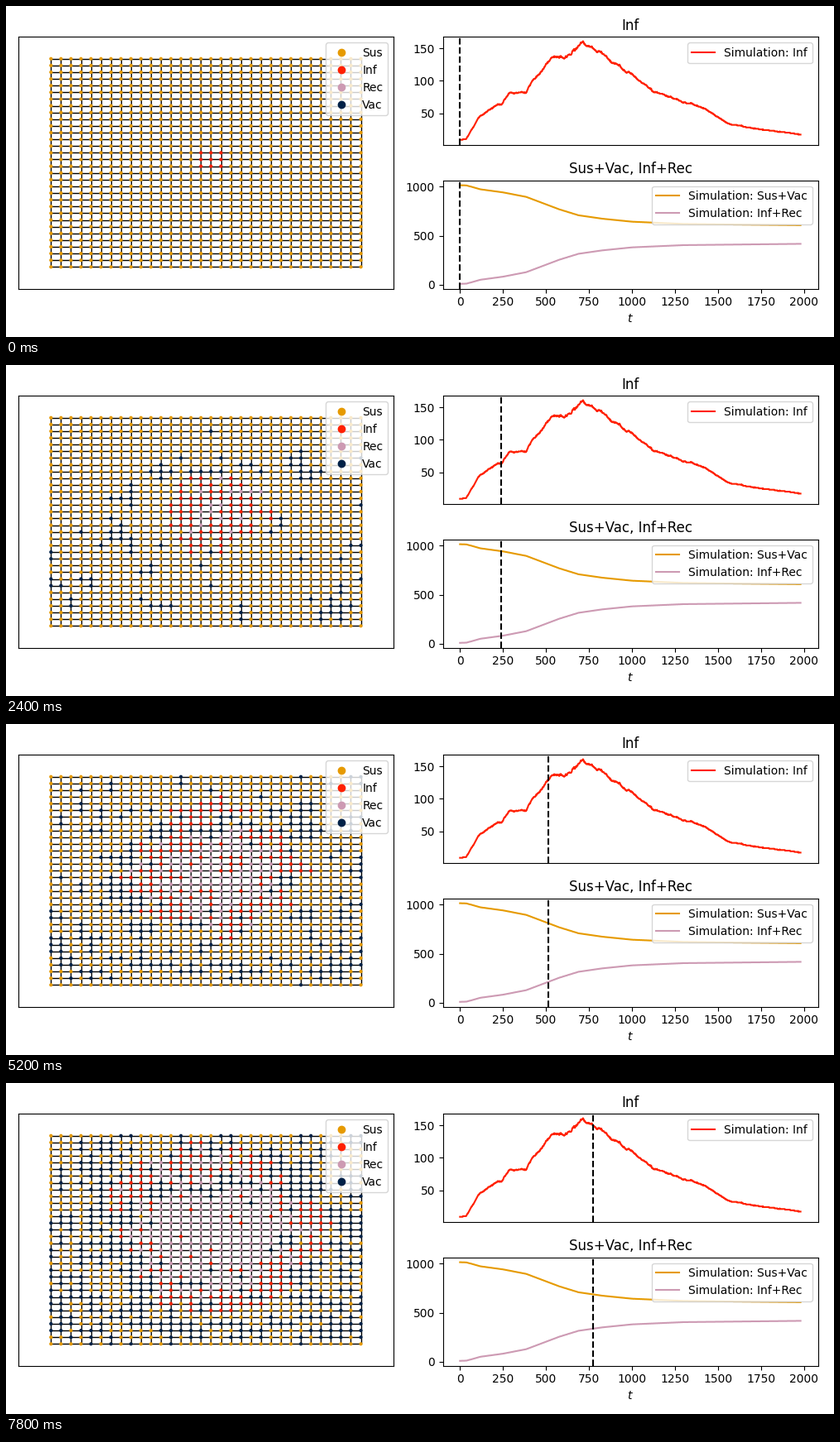
Write a matplotlib script that moves like this. It is 1000 px wide and 400 px high and loops after 8 s.

```python
import random

import matplotlib.pyplot as plt
import numpy as np
from matplotlib.animation import FuncAnimation
from matplotlib.collections import LineCollection
from matplotlib.lines import Line2D

N = 32
FRAMES = 40
STEP = 19.8          # simulation time per frame
T_END = 1980
SUS, INF, REC, VAC = range(4)
NAMES = ["Sus", "Inf", "Rec", "Vac"]
COLORS = np.array(["#E69A00", "#FF2000", "#CD9AB3", "#002147"])

# Key points (time, count): infected now, and infected at any time so far
INF_KEYS = [(0, 9), (36, 10), (113, 45), (209, 62), (245, 64), (290, 82),
            (382, 80), (420, 100), (531, 133), (622, 138), (714, 159),
            (900, 127), (1130, 83), (1300, 67), (1420, 58), (1560, 34),
            (1700, 27), (T_END, 17)]
EVER_KEYS = [(0, 9), (38, 11), (120, 51), (250, 82), (385, 128), (577, 255),
             (690, 316), (830, 351), (1000, 381), (1300, 404), (T_END, 417)]


def curve(keys, t):
    return np.interp(t, *zip(*keys))


def vaccinated(t):
    return int(0.34 * t + 0.00013 * t * t)


def neighbours(node):
    c, r = node
    near = [(c - 1, r), (c + 1, r), (c, r - 1), (c, r + 1)]
    return [(a, b) for a, b in near if 0 <= a < N and 0 <= b < N]


def simulate():
    """Node states per frame, following the infection and vaccination counts."""
    rng = random.Random(7)
    nodes = [(c, r) for c in range(N) for r in range(N)]
    state = dict.fromkeys(nodes, SUS)
    front = {(c, r): np.hypot(c - 16, 0.92 * (r - 17)) + rng.gauss(0, 1.3)
             for c, r in nodes}
    sick = [(c, r) for c in (15, 16, 17) for r in (15, 16, 17)]
    state.update(dict.fromkeys(sick, INF))
    ever, doses, t = len(sick), 0, 0
    shots = []

    def infect():
        exposed = {m for n in sick for m in neighbours(n) if state[m] == SUS}
        if not exposed:
            return False
        node = min(sorted(exposed), key=front.get)
        state[node] = INF
        sick.append(node)
        return True

    def recover():
        older = min(rng.randrange(len(sick)) for _ in range(2))
        state[sick.pop(older)] = REC

    def vaccinate():
        free = [n for n in nodes if state[n] == SUS]
        if rng.random() < 0.5:
            free = [n for n in free
                    if any(state[m] == VAC for m in neighbours(n))] or free
        state[rng.choice(free)] = VAC

    for k in range(FRAMES):
        while t < k * STEP:
            t += 1
            while ever < int(curve(EVER_KEYS, t)) and infect():
                ever += 1
            while len(sick) > curve(INF_KEYS, t):
                recover()
            while doses < vaccinated(t):
                vaccinate()
                doses += 1
        shots.append([state[n] for n in nodes])
    return np.array(nodes), np.array(shots)


def jitter(size, memory):
    """Unit-size random wander that keeps returning to zero."""
    steps = np.random.default_rng(3).normal(0, 1, size)
    kernel = np.exp(-np.arange(6 * memory) / memory)
    wander = np.convolve(steps, kernel)[:size]
    return wander / wander.std()


nodes, shots = simulate()
fig = plt.figure(figsize=(10, 4), dpi=100, facecolor="white")
grid_ax = plt.subplot2grid((2, 2), (0, 0), rowspan=2)
inf_ax = plt.subplot2grid((2, 2), (0, 1))
sum_ax = plt.subplot2grid((2, 2), (1, 1))

# Lattice
span = (-3.255, 34.255)
grid_ax.set(xlim=span, ylim=span, xticks=[], yticks=[])
end = N - 1
lines = [[(0, i), (end, i)] for i in range(N)]
lines += [[(i, 0), (i, end)] for i in range(N)]
grid_ax.add_collection(LineCollection(lines, colors="black", linewidths=1,
                                      zorder=1), autolim=False)
dots = grid_ax.scatter(nodes[:, 0], nodes[:, 1], s=4,
                       c=COLORS[shots[0]], zorder=2)
keys = [Line2D([], [], color=col, marker="o", linestyle="none", label=name)
        for name, col in zip(NAMES, COLORS)]
grid_ax.legend(handles=keys, loc="upper right")

# Time series
ts = np.linspace(0, T_END, 1000)
infected = curve(INF_KEYS, ts)
infected += jitter(ts.size, 8) * infected / 90
ever = np.round(curve(EVER_KEYS, ts))
inf_ax.plot(ts, np.round(infected), color=COLORS[INF],
            label="Simulation: Inf")
sum_ax.plot(ts, N * N - ever, color=COLORS[SUS], label="Simulation: Sus+Vac")
sum_ax.plot(ts, ever, color=COLORS[REC], label="Simulation: Inf+Rec")

inf_ax.set(title="Inf", ylim=(0.4, 167.6), yticks=[50, 100, 150])
sum_ax.set(title="Sus+Vac, Inf+Rec", xlabel="$t$", ylim=(-41.3, 1065.3),
           yticks=[0, 500, 1000])
markers = []
for ax in (inf_ax, sum_ax):
    ax.set(xlim=(-99, 2081), xticks=range(0, 2001, 250))
    ax.legend(loc="upper right")
    markers.append(ax.axvline(0, color="black", linestyle="--"))

# The upper plot keeps the room of its ticks but shows none
inf_ax.tick_params(labelbottom=False)
fig.tight_layout()
inf_ax.set_xticks([])


def draw(k):
    dots.set_color(COLORS[shots[k]])
    for m in markers:
        m.set_xdata([k * STEP, k * STEP])
    return [dots, *markers]


anim = FuncAnimation(fig, draw, frames=FRAMES, interval=200, repeat=True,
                     repeat_delay=0, blit=False)
plt.show()
```
